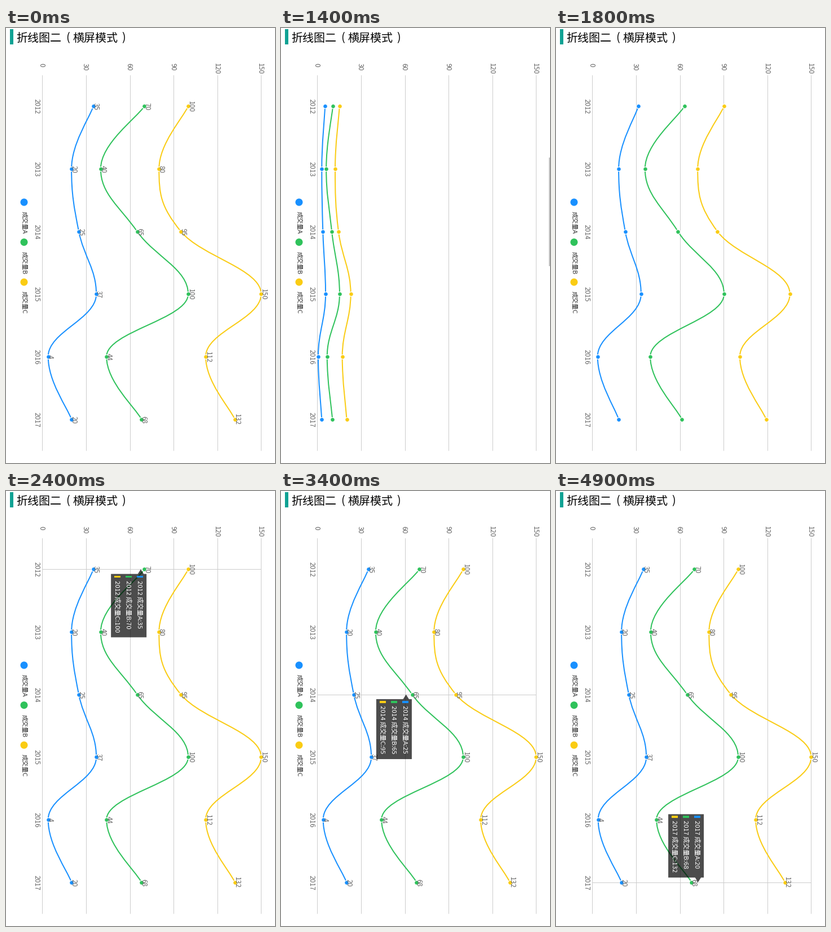
Write a matplotlib script that moves like this. It is 477 by 769 pixels and loops after 5.9 s.

```python
import matplotlib.pyplot as plt
from matplotlib.animation import FuncAnimation
from matplotlib.patches import Circle, PathPatch, Polygon, Rectangle
from matplotlib.path import Path

W, H, DPI = 477, 769, 64
STEP_MS, LOOP_MS = 100, 5900
PX = 72 / DPI
FONT = "Noto Sans CJK JP"

X0, X_STEP = 64.4, 77.6          # value axis runs to the right
TOP, BOTTOM = 83, 747            # category axis runs downwards
YEARS = range(2012, 2018)
ROWS = [TOP + (BOTTOM - TOP) / 6 * (i + 0.5) for i in range(6)]
SERIES = [
    ("成交量A", "#1890ff", [35, 20, 25, 37, 4, 20]),
    ("成交量B", "#2fc25b", [70, 40, 65, 100, 44, 68]),
    ("成交量C", "#facc14", [100, 80, 95, 150, 112, 132]),
]

fig = plt.figure(figsize=(W / DPI, H / DPI), dpi=DPI, facecolor="white")
ax = fig.add_axes([0, 0, 1, 1])
ax.set_xlim(0, W)
ax.set_ylim(H, 0)
ax.axis("off")


def value_x(value):
    return X0 + value * X_STEP / 30


def text(x, y, label, size, color, ha="left", rotation=270, zorder=6):
    return ax.text(x, y, label, fontsize=size * PX, color=color, family=FONT,
                   ha=ha, va="baseline", rotation=rotation,
                   rotation_mode="anchor", zorder=zorder)


def rect(x, y, w, h, color, zorder=1):
    return ax.add_patch(Rectangle((x, y), w, h, fc=color, lw=0, zorder=zorder))


def rule(xs, ys):
    return ax.plot(xs, ys, color="#cccccc", lw=PX, snap=True, zorder=1,
                   solid_capstyle="butt")[0]


def smooth_path(xs, ys, k=0.2):
    """Bezier path whose tangents are vertical at local extremes."""
    last = len(xs) - 1

    def slope(i):
        a, b = max(i - 1, 0), min(i + 1, last)
        dx = xs[b] - xs[a]
        if 0 < i < last and (xs[i] - xs[a]) * (xs[b] - xs[i]) <= 0:
            dx = 0
        return dx * k, (ys[b] - ys[a]) * k

    verts = [(xs[0], ys[0])]
    for i in range(last):
        (ax_, ay), (bx, by) = slope(i), slope(i + 1)
        verts += [(xs[i] + ax_, ys[i] + ay),
                  (xs[i + 1] - bx, ys[i + 1] - by),
                  (xs[i + 1], ys[i + 1])]
    return Path(verts, [Path.MOVETO] + [Path.CURVE4] * (3 * last))


# Title
rect(7, 2, 6, 27, "#10a294")
for x, part, ha in [(18.5, "折线图二", "left"), (109.5, "(", "center"),
                    (118.5, "横屏模式", "left"), (209, ")", "center")]:
    text(x, 23.5, part, 20, "black", ha, rotation=0)

# Axes
for i in range(6):
    x = X0 + i * X_STEP
    rule([x, x], [TOP, BOTTOM])
    text(x - 5, 62, str(30 * i), 12, "#666666")
for year, y in zip(YEARS, ROWS):
    text(50.7, y + 0.5, str(year), 12, "#666666", "center")

# Legend
for i, (name, color, _) in enumerate(SERIES):
    y = 308 + 70.6 * i
    ax.add_patch(Circle((32, y), 6.5, fc=color, lw=0))
    text(28.5, y + 16, name, 11, "#333333")

# Series
curves, dots, value_labels = [], [], []
for i, (_, color, values) in enumerate(SERIES):
    z = 2 + i
    curves.append(ax.add_patch(PathPatch(Path([(0, 0)]), fc="none", ec=color,
                                         lw=2 * PX, zorder=z)))
    dots.append(ax.plot([], [], "o", ms=7.8 * PX, mfc=color, mec="white",
                        mew=1.2 * PX, zorder=z + 0.5)[0])
    value_labels += [text(value_x(v) + 0.5, y + 0.7, str(v), 12, "#666666", "center")
                     for v, y in zip(values, ROWS)]

# Page scroll bar
scroll_bar = rect(475, 229, 2, 192, "#b4b4b4")

# Tooltip
crosshair = rule([X0, value_x(150)], [0, 0])
bubble = ax.add_patch(Polygon([(0, 0)] * 7, fc="black", alpha=0.7, lw=0, zorder=8))
swatches = [rect(0, 0, 11.5, 3.8, color, 9) for _, color, _ in SERIES]
entries = [text(0, 0, "", 11.4, "white", zorder=9) for _ in SERIES]
tooltip = [crosshair, bubble, *swatches, *entries]


def place_tooltip(index):
    y = ROWS[index]
    values = [s[2][index] for s in SERIES]
    right = value_x(sum(values) / 3) + 8
    left, tip = right - 63, right - 10.2
    length = 106 + 6 * (len(str(values[-1])) - 2)
    side = 1 if y + 8.3 + length < BOTTOM else -1
    near = y + side * 8.3
    far = near + side * length
    top = min(near, far)
    bubble.set_xy([(left, near), (tip - 5.2, near), (tip, y), (tip + 5.2, near),
                   (right, near), (right, far), (left, far)])
    crosshair.set_ydata([y, y])
    for i, (name, _, _) in enumerate(SERIES):
        middle = right - 11.6 - 20 * i
        swatches[i].set_xy((middle - 5.75, top + 3))
        entries[i].set_position((middle - 4.3, top + 11))
        entries[i].set_text(f"{YEARS[index]} {name}:{values[i]}")


def growth(ms):
    if ms < 1000:
        return 1
    return min(1, (ms - 905) / 926) ** 3


def update(frame):
    ms = frame * STEP_MS
    grown = growth(ms)
    for (_, _, values), curve, dot in zip(SERIES, curves, dots):
        xs = [value_x(v * grown) for v in values]
        curve.set_path(smooth_path(xs, ROWS))
        dot.set_data(xs, ROWS)
    for label in value_labels:
        label.set_visible(grown == 1)

    scroll_bar.set_visible(1000 <= ms < 1500)
    scroll_bar.set_alpha(0.8 if ms >= 1400 else 1)

    shown = ms >= 2400
    for artist in tooltip:
        artist.set_visible(shown)
    if shown:
        place_tooltip(min((ms - 2400) // 500, 5))
    return []


anim = FuncAnimation(fig, update, frames=LOOP_MS // STEP_MS, interval=STEP_MS,
                     init_func=lambda: update(0), repeat=True, repeat_delay=0)
plt.show()
```
